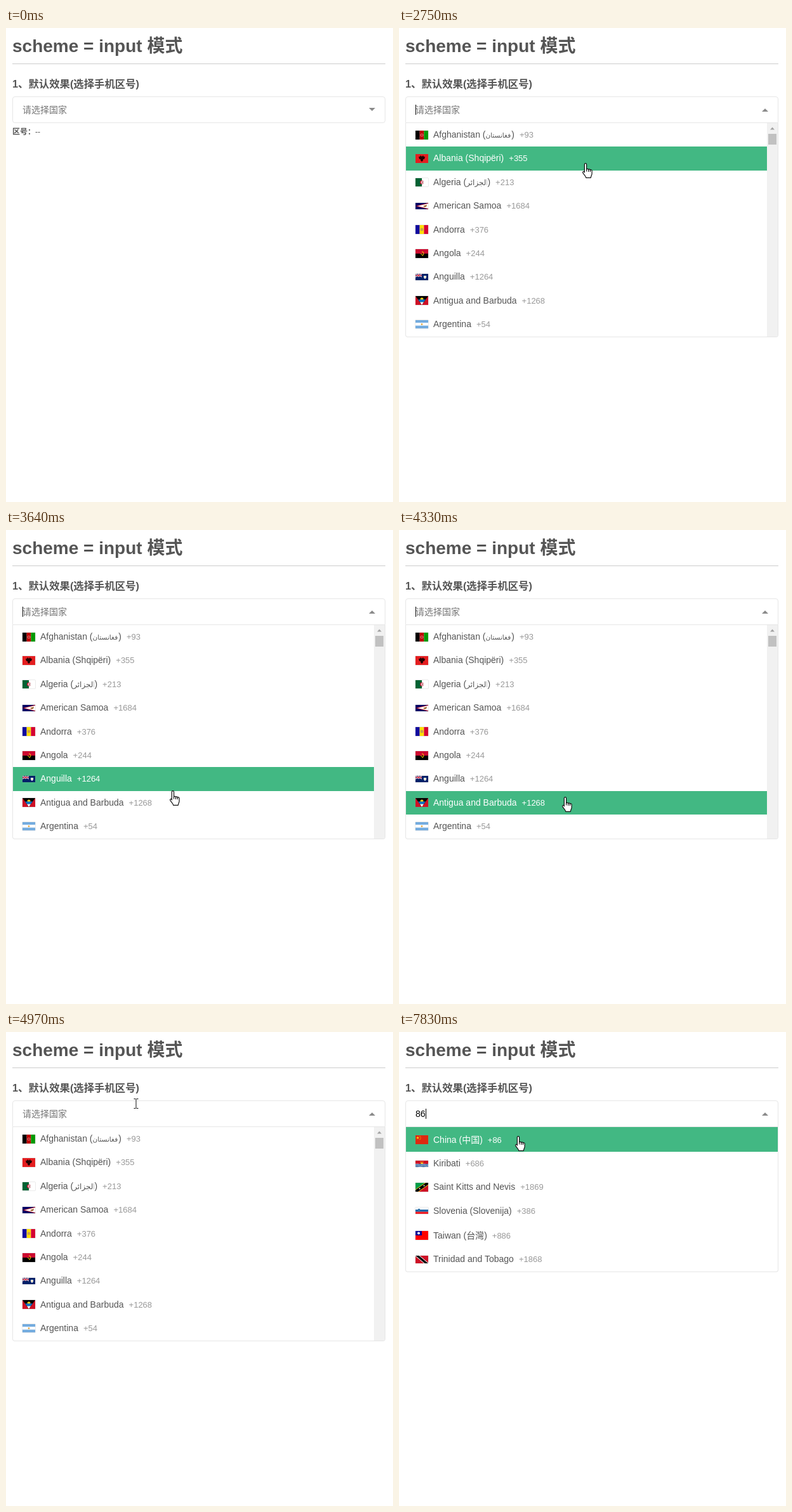
Write an HTML page that moves like this. It is 610x748 px and loops after 8000 ms.

```html
<!DOCTYPE html>
<html lang="zh-CN">
<head>
<meta charset="utf-8">
<style>
html, body { margin: 0; width: 100%; height: 100%; overflow: hidden; background: #fff; }
body { position: relative; color: #555; font: 14px "Liberation Sans", Arial, "Noto Sans CJK SC", "Noto Sans CJK", sans-serif; }
body > * { position: absolute; margin: 0; left: 10px; white-space: nowrap; }
h1 { top: 9px; font-size: 28px; line-height: 40px; }
hr { top: 56px; width: 588px; height: 1px; border: 0; background: #ccc; }
h3 { top: 78px; font-size: 16.38px; line-height: 20px; }
#field { top: 108px; width: 588px; height: 42px; box-sizing: border-box; border: 1px solid #e6e6e6; border-radius: 4px; }
#field.open { border-radius: 4px 4px 0 0; }
#value { top: 119px; left: 26px; line-height: 20px; color: #000; }
#value.empty { color: #757575; }
#caret { top: 121px; width: 1px; height: 16px; background: #000; }
#code { top: 154px; font-size: 12px; line-height: 20px; }
#drop { top: 150px; width: 588px; max-height: 349px; box-sizing: border-box; overflow: hidden;
  border: 1px solid #e6e6e6; border-top: 0; border-radius: 0 0 4px 4px; background: #fff; }
.row { position: relative; height: 37.4px; line-height: 37.4px; padding-left: 43px; box-sizing: border-box; }
.tall { height: 39px; padding-top: 1.6px; }
.scroll .row { margin-right: 17px; }
.row svg { position: absolute; left: 15px; top: 0; bottom: 0; margin: auto 0; box-shadow: 0 0 1px #888; }
.row i { font-style: normal; display: inline-block; line-height: 1; overflow-x: clip; }
.row b { display: inline-block; font-weight: normal; font-size: 13px; color: #999; margin-left: 8px; line-height: 1; }
.row.on { background: #42b883; }
.row.on, .row.on b { color: #fff; }
#bar { position: absolute; right: 0; top: 0; width: 17px; height: 348px; background: #f1f1f1; }
#thumb { position: absolute; left: 2px; top: 17px; width: 13px; background: #c1c1c1; }
#bar svg { position: absolute; left: 0; top: 0; }
#over { left: 0; top: 0; }
</style>
</head>
<body>
<h1>scheme = input 模式</h1>
<hr>
<h3>1、默认效果(选择手机区号)</h3>
<div id="field"></div>
<div id="code"><b>区号：</b>--</div>
<div id="value"></div>
<div id="caret"></div>
<div id="drop">
  <div id="rows"></div>
  <div id="bar"><div id="thumb"></div>
    <svg width="17" height="348"><path d="M5 10.5h7l-3.5-4z" fill="#a3a3a3"/><path d="M5 337h7l-3.5 4z" fill="#505050"/></svg>
  </div>
</div>
<svg id="over" width="610" height="748">
  <path id="chevron" d="M572 126h10l-5 5z" fill="#8a8a8a"/>
  <circle id="press" cx="295" cy="127.5" r="12" fill="#fefc7c"/>
  <g id="arrow" fill="#fff" stroke="#000" stroke-linejoin="round"><path d="M.5.5v16l3.7-3.5 2.4 5.6 2.3-1-2.4-5.4h5z"/></g>
  <g id="beam" fill="none" stroke="#111"><path d="M-3.5-7.5h3M.5-7.5h3M0-7V7M-3.5 7.5h3M.5 7.5h3"/></g>
  <g id="hand" fill="#fff" stroke="#111" stroke-width="1.2" stroke-linejoin="round" stroke-linecap="round">
    <path d="M-1.6 15V2.2a1.6 1.6 0 0 1 3.2 0V10c.5-1 2.7-.9 3 .4.6-.9 2.6-.6 2.8.6.8-.6 2.6-.2 2.7 1.3v4.6c0 2-1.5 3.2-1.8 6.4H.8c-.3-2-2.8-4.3-4.8-7.4-1.2-2 .9-3.4 2.4-1.4z"/>
    <path d="M1.6 9v4M4.6 10.4v3M7.4 11v2.6" fill="none"/>
  </g>
</svg>
<script>
const $ = id => document.getElementById(id);

// Flag parts on a stage 20 wide
const rect = (x, y, w, h, c) => `<rect x="${x}" y="${y}" width="${w}" height="${h}" fill="#${c}"/>`;
const dot = (x, y, r, c) => `<circle cx="${x}" cy="${y}" r="${r}" fill="#${c}"/>`;
const poly = (pts, c) => `<polygon points="${pts}" fill="#${c}"/>`;
const line = (d, c, w) => `<path d="${d}" stroke="#${c}" stroke-width="${w}" fill="none"/>`;
const ring = (x, y, r, c) => `<circle cx="${x}" cy="${y}" r="${r}" fill="none" stroke="#${c}" stroke-width=".8" stroke-dasharray=".8 .8"/>`;
const upright = (...cs) => cs.map((c, i) => rect(i * 20 / cs.length, 0, 20 / cs.length, 15, c)).join('');
const level = (h, ...cs) => cs.map((c, i) => rect(0, i * h / cs.length, 20, h / cs.length, c)).join('');
const ensign = c => rect(0, 0, 20, 10, c) + line('M0 0L10 5M10 0L0 5', 'fff', 1) + line('M0 0L10 5M10 0L0 5', 'c8102e', .4)
  + line('M5 0V5M0 2.5H10', 'fff', 1.8) + line('M5 0V5M0 2.5H10', 'c8102e', 1);
const waves = y => `M0 ${y}q2.5-1 5 0t5 0 5 0 5 0`;

// name, local name, code, flag height, flag, local font size, local width
const places = {
  AF: ['Afghanistan', 'افغانستان', 93, 14, upright('000', 'be0000', '009a00') + dot(10, 7, 2.5, 'd86060') + dot(10, 7, 1.2, 'b01010'), 10.5, 40.8],
  AL: ['Albania', 'Shqipëri', 355, 14, rect(0, 0, 20, 14, 'e41e20') + poly('10 4 8 2 7 4 5 4 6 8 8 8 8 10 10 12 12 10 12 8 14 8 15 4 13 4 12 2', '200')],
  DZ: ['Algeria', 'الجزائر', 213, 13, upright('006233', 'fff') + dot(10, 6.5, 3, 'd21034') + dot(10.8, 6.5, 2.3, 'dde8e0') + dot(11, 6.5, .9, 'd21034'), 12, 33.3],
  AS: ['American Samoa', '', 1684, 10, rect(0, 0, 20, 10, '000066') + poly('20 0 0 5 20 10', 'bd1021') + poly('20 1 3 5 20 9', 'fff') + poly('12 5 18 3 17 6 14 6.5', '9a5a20')],
  AD: ['Andorra', '', 376, 14, upright('10069f', 'fedd00', 'd50032') + dot(10, 7, 2.4, 'c9a04b')],
  AO: ['Angola', '', 244, 14, level(14, 'cc092f', '000') + line('M10 4a3 3 0 0 1 0 6M8 7l4 3', 'ffcb00', 1)],
  AI: ['Anguilla', '', 1264, 10, ensign('012169') + poly('13 3 17 3 17 6 15 8 13 6', 'fff') + dot(15, 5, .8, 'f58220')],
  AG: ['Antigua and Barbuda', '', 1268, 14, rect(0, 0, 20, 14, 'ce1126') + poly('0 0 20 0 10 14', '000') + dot(10, 5, 2.5, 'fcd116') + poly('4 5.5 16 5.5 13 9.5 7 9.5', '0072c6') + poly('7 9.5 13 9.5 10 14', 'fff')],
  AR: ['Argentina', '', 54, 13, level(13, '74acdf', 'fff', '74acdf') + dot(10, 6.5, 1.3, 'e0a030')],
  BD: ['Bangladesh', 'বাংলাদেশ', 880, 12, rect(0, 0, 20, 12, '006a4e') + dot(9, 6, 4, 'f42a41'), 13, 57.8],
  BA: ['Bosnia and Herzegovina', 'Босна и Херцеговина', 387, 10, rect(0, 0, 20, 10, '002395') + poly('6 0 16 0 16 10', 'fecb00') + '<path d="M4 0L14 10" stroke="#fff" stroke-width=".6" stroke-dasharray="1 1"/>'],
  VG: ['British Virgin Islands', '', 1284, 10, ensign('012169') + poly('13 2.5 18 2.5 17.5 6 15.5 8 13.5 6', '007a3d') + line('M15.5 3.5v3', 'ffd100', .8)],
  KH: ['Cambodia', 'កម្ពុជា', 855, 13, level(13, '032ea1', 'e00025', 'e00025', '032ea1') + poly('6 9 6 7 8 6 8 5 10 3.5 12 5 12 6 14 7 14 9', 'fff'), 12, 39],
  CV: ['Cape Verde', 'Kabu Verdi', 238, 12, rect(0, 0, 20, 12, '003893') + rect(0, 6, 20, 3, 'fff') + rect(0, 7, 20, 1, 'cf2027') + ring(7.5, 7.5, 2.8, 'f7d116')],
  CN: ['China', '中国', 86, 14, rect(0, 0, 20, 14, 'de2910') + poly('3.5 1.5 4.1 3.2 6 3.2 4.5 4.3 5 6 3.5 5 2 6 2.5 4.3 1 3.2 2.9 3.2', 'ffde00') + [[7, 1.5], [8, 3], [8, 5], [7, 6.5]].map(p => dot(...p, .5, 'ffde00')).join('')],
  CK: ['Cook Islands', '', 682, 10, ensign('012169') + ring(15, 5, 2.8, 'fff')],
  KI: ['Kiribati', '', 686, 10, rect(0, 0, 20, 10, 'ce1126') + dot(10, 5, 2, 'fcd116') + line('M7 2h6', 'fcd116', .7) + rect(0, 5, 20, 5, '003f87') + line([5.7, 7.4, 9.1].map(waves).join(''), 'fff', .7)],
  KN: ['Saint Kitts and Nevis', '', 1869, 14, rect(0, 0, 20, 14, '009e49') + poly('20 0 20 14 0 14', 'ce1126') + line('M-1 14.7L21-.7', 'fcd116', 6) + line('M-1 14.7L21-.7', '000', 4.5) + dot(6.5, 9.3, 1, 'fff') + dot(13.5, 4.6, 1, 'fff')],
  SI: ['Slovenia', 'Slovenija', 386, 10, level(10, 'fff', '005da4', 'ed1c24') + poly('4 2 7 2 7 4.5 5.5 6 4 4.5', '1060a0') + line('M4.5 4.5l1-1 1 1', 'fff', .6)],
  TW: ['Taiwan', '台灣', 886, 14, rect(0, 0, 20, 14, 'fe0000') + rect(0, 0, 10, 7, '000095') + dot(5, 3.5, 2, 'fff')],
  TT: ['Trinidad and Tobago', '', 1868, 12, rect(0, 0, 20, 12, 'ce1126') + line('M1-1.5L19 13.5', 'fff', 5) + line('M1-1.5L19 13.5', '000', 3.4)]
};
const lists = {
  '': 'AF AL DZ AS AD AO AI AG AR',
  8: 'AS AG BD BA VG KH CV CN CK',
  86: 'CN KI KN SI TW TT'
};
const tall = ['BD', 'KH', 'CN', 'TW'];

function rowHtml(key) {
  const [name, local, code, h, flag, size, width] = places[key];
  const native = size ? `<i style="font-size:${size}px;width:${width}px">${local}</i>` : local;
  const text = local ? `${name} (${native})` : name;
  return `<div class="row${tall.includes(key) ? ' tall' : ''}"><svg width="20" height="${h}">${flag}</svg><span>${text}</span><b>+${code}</b></div>`;
}

let shown = null;
function fill(query) {
  if (shown === query) return;
  shown = query;
  $('rows').innerHTML = lists[query].split(' ').map(rowHtml).join('');
  const scroll = query !== '86';
  $('drop').className = scroll ? 'scroll' : '';
  show('bar', scroll);
  $('thumb').style.height = (query ? 54 : 17) + 'px';
}

// Pointer path: time, x, y
const path = [
  [110, 516, 722], [250, 470, 610], [600, 330, 220], [850, 299, 129], [950, 297.5, 128],
  [2210, 297.5, 128], [2470, 294, 204], [2620, 294, 204], [2750, 294, 213],
  [3390, 270, 388], [3640, 263, 411], [3870, 262, 421], [4330, 262, 421],
  [4640, 256, 303], [4970, 205, 113], [5150, 205, 113], [5480, 193, 121],
  [7650, 193, 121], [7830, 188, 164]
];
// Caret switches on and off in turn
const blinks = [1220, 1780, 2280, 2800, 3320, 3840, 4330, 4870, 5400, 5940, 6400, 7140, 7650];

function pointer(t) {
  const i = path.findIndex(p => p[0] > t);
  if (i < 0) return path[path.length - 1].slice(1);
  const [a, b] = [path[i - 1], path[i]];
  const k = (t - a[0]) / (b[0] - a[0]);
  return [1, 2].map(n => a[n] + (b[n] - a[n]) * k);
}
const show = (id, on) => $(id).style.display = on ? '' : 'none';

function draw(t) {
  const open = t >= 1220;
  const query = t < 6400 ? '' : t < 6630 ? '8' : '86';
  fill(query);
  $('field').className = open ? 'open' : '';
  show('drop', open);
  $('value').textContent = query || '请选择国家';
  $('value').className = query ? '' : 'empty';
  $('caret').style.left = 26 + query.length * 8 + 'px';
  show('caret', blinks.filter(b => b <= t).length % 2);

  const turn = Math.min(1, Math.max(0, (t - 1215) / 235));
  $('chevron').setAttribute('transform', `rotate(${-180 * turn ** .9} 577 129)`);
  show('press', t >= 1220 && t < 1450);

  const here = t >= 110;
  const [x, y] = here ? pointer(t) : [0, 0];
  const kind = !here ? '' : y > 108 && y < 150 ? 'beam' : open ? 'hand' : 'arrow';
  for (const id of ['arrow', 'beam', 'hand']) {
    show(id, id === kind);
    $(id).setAttribute('transform', `translate(${Math.round(x)} ${Math.round(y)})`);
  }
  let top = 150;
  for (const row of $('rows').children) {
    const end = top + (row.classList.contains('tall') ? 39 : 37.4);
    row.classList.toggle('on', kind === 'hand' && y >= top && y < end);
    top = end;
  }
}

const start = performance.now();
function tick() {
  draw((performance.now() - start) % 8000);
  requestAnimationFrame(tick);
}
tick();
</script>
</body>
</html>
```
